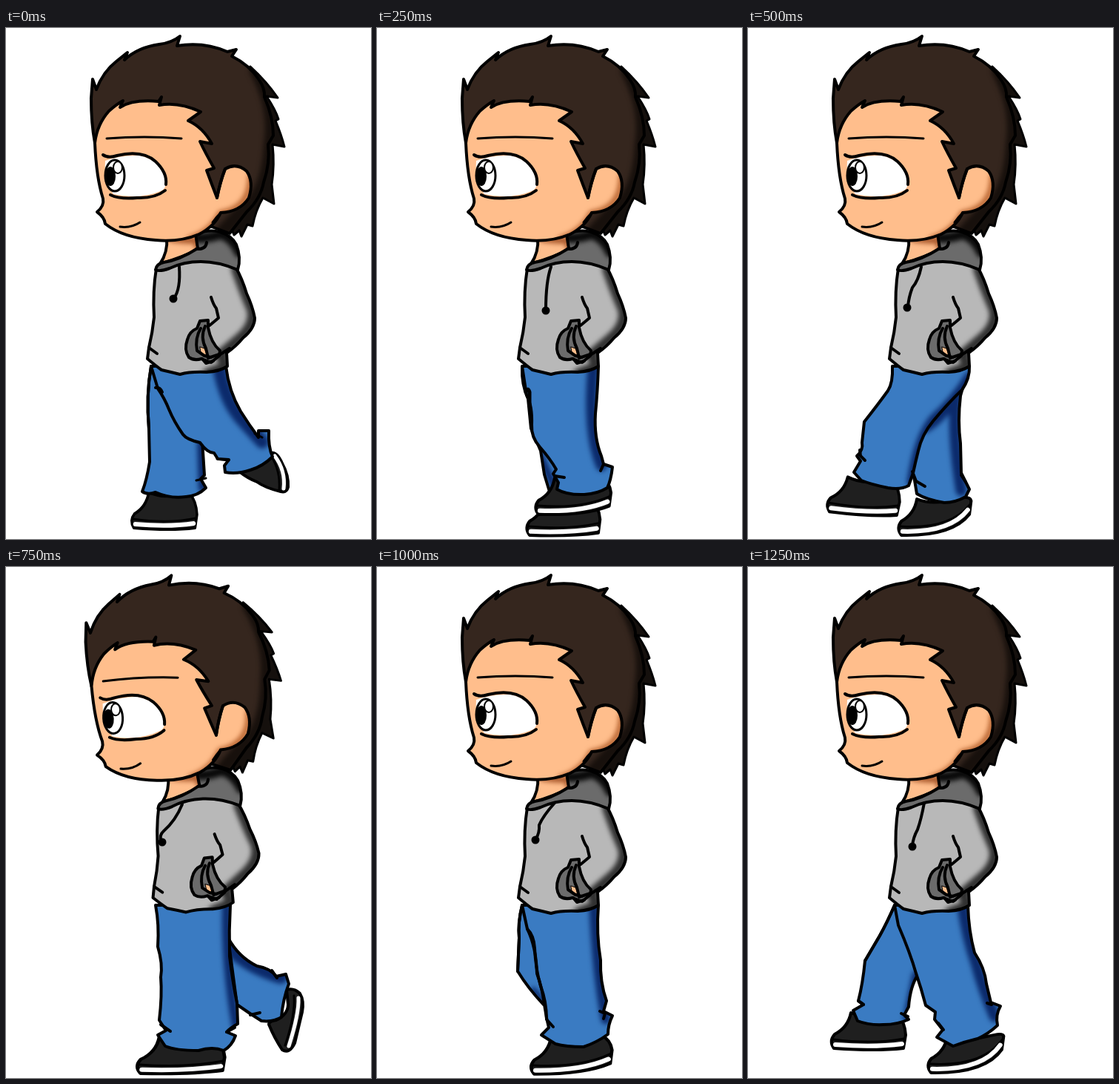
An HTML page with a canvas for the animation above (1.5 s loop, 493x689 px).

```html
<!DOCTYPE html>
<html>
<head>
<meta charset="utf-8">
<style>
html, body { margin: 0; width: 100%; height: 100%; overflow: hidden; background: #fff; }
canvas { display: block; }
</style>
</head>
<body>
<canvas id="stage" width="493" height="689"></canvas>
<script>
const ctx = document.getElementById('stage').getContext('2d');
const STEP = 250;
const HAIR = '#35261e', SKIN = '#ffbe8c', CLOTH = '#b8b8b8', HOOD = '#6b6b6b';
const JEANS = '#3a7bc2', NAVY = '#0b2a6b', SHOE = '#1f1f1f';

function line(d, width = 4, color = '#000') {
  ctx.lineWidth = width;
  ctx.strokeStyle = color;
  ctx.stroke(new Path2D(d));
}

// Filled outline with an optional soft shadow kept inside the shape.
function part(d, fill, shade, shadeColor, shadeWidth = 14, width = 4) {
  const path = new Path2D(d);
  ctx.fillStyle = fill;
  ctx.fill(path);
  if (shade) {
    ctx.save();
    ctx.clip(path);
    ctx.filter = 'blur(3px)';
    line(shade, shadeWidth, shadeColor);
    ctx.restore();
  }
  if (width) line(d, width);
}

function oval(x, y, rx, ry, fill, width) {
  ctx.beginPath();
  ctx.ellipse(x, y, rx, ry, 0, 0, 7);
  ctx.fillStyle = fill;
  ctx.fill();
  if (width) {
    ctx.lineWidth = width;
    ctx.strokeStyle = '#000';
    ctx.stroke();
  }
}

function turned(deg, x, y, draw) {
  ctx.save();
  ctx.translate(x, y);
  ctx.rotate(deg * Math.PI / 180);
  ctx.translate(-x, -y);
  draw();
  ctx.restore();
}

const jeans = (d, shade, width) => part(d, JEANS, shade, NAVY, width);

// Placed by the lower toe corner; lift raises the heel and bends the sole.
function shoe(x, y, size, deg, lift = 0) {
  ctx.save();
  ctx.translate(x, y);
  ctx.rotate(deg * Math.PI / 180);
  ctx.scale(size, 1);
  part(`M26-48Q45-40 65-44L88-48Q99-${36 + lift / 2} 100-${18 + lift}L97-${lift}Q${60 + lift / 2} 4 3 0Q-4-10 4-19Q22-28 26-48Z`, SHOE);
  line(`M2-12Q${56 + lift / 2}-5 98-${13 + lift}`, 3);
  line(`M5-5Q${57 + lift / 2}-1 95-${6 + lift}`, 6, '#fff');
  ctx.restore();
}

const poses = [
  {
    string: 'M234 322Q236 352 227 364', bead: [226, 365],
    legs() {
      shoe(170, 674, .88, 0);
      part('M315 598Q342 592 358 573Q366 571 373 587Q382 603 381 619Q379 627 371 625Q350 620 339 612Q326 607 315 598Z', SHOE);
      line('M363 577Q378 597 375 621', 5, '#fff');
      line('M358 577Q371 597 369 623', 3);
      jeans('M196 456Q189 495 193 540L194 585Q190 610 184 625Q191 630 202 626Q222 635 243 632Q259 631 270 620L263 608L268 603L265 556L240 490Z', 'M264 560L266 620', 12);
      jeans('M196 456L297 456Q301 490 317 517Q329 536 341 552L341 543L355 543Q354 565 360 578Q347 591 330 596Q312 602 296 599L295 590L301 582L286 581L281 573Q272 573 262 559Q244 555 239 548Q227 531 220 514Q214 499 205 486Z', 'M288 458Q296 502 317 526L346 558', 18);
      line('M202 485Q208 484 211 491');
      line('M196 456Q189 495 193 540');
      line('M257 610L270 607M285 581L301 583M336 547L346 552', 3);
    }
  },
  {
    string: 'M235 322Q228 342 228 380', bead: [228, 381],
    legs() {
      shoe(203, 684, .99, -2);
      jeans('M196 458Q195 480 204 500L208 540L221 570L226 602L233 625L246 624L240 580L215 490Z', 'M215 565L240 620', 10);
      shoe(215, 656, 1.02, -2, 8);
      jeans('M196 456L299 456Q298 490 295 520Q293 553 303 577L306 588L318 592Q316 610 311 620Q298 628 280 629Q257 630 243 622L245 613L238 601L242 595Q234 581 220 565Q208 552 209 535Q210 509 202 495Z', 'M292 458Q284 545 303 590', 15);
      line('M201 490Q204 484 206 491L206 510', 5);
      line('M240 604L253 606M306 588L302 597');
    }
  },
  {
    string: 'M234 322Q230 341 222 350Q217 363 216 376', bead: [215, 377],
    legs() {
      shoe(204, 684, .99, -2, 25);
      jeans('M298 456Q291 482 287 496Q283 530 287 560L288 600L299 622L294 632Q280 640 265 640Q241 636 228 628L225 610L222 598L228 560L255 500Z', 'M240 538Q264 524 281 492Q275 545 288 624', 15);
      shoe(107, 652, .97, 3);
      jeans('M195 456L299 456Q300 472 289 488Q271 505 250 530Q235 548 230 570Q226 586 223 600L217 617Q206 623 189 620Q165 615 153 610L143 599L152 584L147 577Q156 569 154 559L157 531Q176 507 189 489Q196 478 195 456Z', 'M299 470Q278 504 251 527Q230 552 221 612', 13);
      line('M151 569L152 577L158 583M222 598L227 611L239 618M288 603L294 612');
    }
  },
  {
    string: 'M238 320Q229 342 213 356Q206 362 210 371', bead: [211, 371], lean: true,
    legs() {
      part('M379 570Q389 567 397 575Q403 585 400 600L390 642Q383 657 373 651Q362 634 356 619Q352 613 365 611Q381 603 381 590Z', SHOE);
      line('M395 581Q396 602 382 646', 5, '#fff');
      line('M389 578Q391 604 377 645', 3);
      jeans('M300 500Q314 526 339 538Q357 541 365 552L378 549L382 562Q374 583 372 607Q361 614 345 612Q329 602 312 590Z', 'M303 513Q325 538 371 552', 20);
      line('M359 544L366 554M330 604L343 601');
      shoe(178, 683, 1.18, -2);
      jeans('M202 456L303 456Q301 490 302 525Q306 559 312 588L313 616Q302 622 298 627L310 632Q305 646 294 652Q279 646 260 652Q229 652 215 646L205 631L216 625L207 611Q211 577 209 553Q212 535 205 512Q207 482 202 456Z', 'M298 458Q296 535 311 620', 12);
      line('M209 617L222 626M298 627L309 621');
    }
  },
  {
    string: 'M240 318Q224 336 219 348Q220 358 214 368', bead: [214, 368],
    legs() {
      shoe(209, 684, 1.1, -3, 9);
      jeans('M196 456Q190 480 192 500L190 545Q204 568 225 590L238 570L220 490Z', 'M211 570L228 588', 7);
      jeans('M196 456L299 456Q296 495 302 530Q301 560 310 585L306 599L318 605Q312 617 312 630Q297 641 279 647Q255 647 241 643L222 631L232 621L229 608L226 590Q223 567 216 548Q215 512 203 488Z', 'M293 458Q297 550 309 610', 13);
      line('M203 488Q212 497 213 514Q214 541 221 565Q229 586 229 610L238 620');
      line('M196 456Q190 480 192 500L190 545');
      line('M301 599L308 602L306 609');
    }
  },
  {
    string: 'M238 318Q234 340 229 354Q223 365 222 376', bead: [222, 377],
    legs() {
      shoe(113, 649, 1, 0);
      jeans('M198 456Q188 479 178 497L158 531Q155 562 149 585L156 590L142 598L148 612Q163 618 183 617Q202 617 217 610L211 604L217 593Q219 565 230 549L232 490Z', 'M227 550L215 608', 11);
      shoe(244, 682, 1.03, -2, 28);
      jeans('M198 456L297 456Q298 491 306 520Q320 541 322 562L328 587L341 592Q334 604 337 618Q324 630 310 636Q293 640 277 646L255 634L263 624L252 610L253 600L240 591Q234 568 227 548Q219 520 203 483Z', 'M290 458Q296 500 308 534Q317 568 333 606', 15);
      line('M198 456Q188 479 178 497L158 531');
      line('M149 585L156 590M323 588L329 590M207 602L216 606M257 615L264 624');
    }
  }
];

function hoodie() {
  part('M203 324Q198 355 200 390Q198 410 193 431L191 446Q203 456 210 461Q223 464 235 467Q249 463 271 464Q289 463 299 456L298 438Q310 430 320 418Q336 405 336 391Q333 375 325 358Q319 338 310 322L260 306Z',
    CLOTH, 'M311 325Q322 357 332 379Q337 399 317 417L289 441L298 456L272 466', '#303030', 14);
  line('M193 431L204 439');
  line('M277 363Q280 373 284 378L287 391L275 401');
  line('M288 441L302 432');
  part('M258 405L262 395L273 394L273 404Q277 425 289 435L288 442L277 451L264 446Q254 449 247 444Q240 434 245 420Q248 409 258 405Z', HOOD);
  part('M262 430L268 432L272 441L264 440Z', SKIN, '', '', 0, 1);
  line('M263 405Q255 418 258 435L268 442L277 444M269 402Q262 417 270 432L273 445L288 440M265 446L270 452L280 449');
}

function hood() {
  part('M217 282L259 277L262 297Q242 308 208 318Q219 302 217 282Z', SKIN, 'M224 284Q245 287 256 286L261 298', '#a9582b', 9);
  part('M256 278Q274 271 289 275Q305 280 311 292Q318 310 313 326Q287 315 263 315Q240 315 221 324Q207 329 202 326Q203 318 213 316Q234 313 259 297Z',
    HOOD, 'M258 283Q272 284 290 278Q306 283 315 303', '#080808', 13);
  line('M257 298Q270 299 271 289');
}

function head() {
  part('M303 184L330 52Q352 72 367 94L352 92Q365 112 368 123L364 125Q372 144 376 160L360 157Q363 185 359 211L362 237L347 229Q337 246 333 267L326 265L318 281L315 273L308 279L304 270L294 275Z', '#15100d', '', '', 0, 3);
  part('M120 155Q115 128 115 95L117 69L122 83Q131 59 149 45L164 33L160 43Q178 26 207 22Q224 20 235 11L231 24Q267 18 299 32L311 29L305 38Q329 50 342 70Q350 82 349 93Q361 120 361 145L354 157Q357 182 348 208Q344 230 325 248L302 277L270 265L170 140Z',
    HAIR, 'M338 58Q365 108 357 158Q354 225 318 248L293 274', '#17100c', 18);
  part('M120 155Q123 130 139 112Q149 103 158 98L154 107Q171 96 206 99L210 93L207 104Q233 99 263 113L246 125Q266 134 278 156L262 153Q269 168 281 189L271 192Q278 211 285 229Q289 208 296 190Q311 181 325 193Q335 207 328 229Q316 248 290 249Q282 267 261 278Q235 289 202 286Q158 283 134 264Q133 255 123 248Q133 240 131 230Q122 202 120 155Z',
    SKIN, 'M330 200Q330 243 289 250Q276 275 248 284', '#b5602c', 7);
  line('M290 249Q284 255 279 262', 3);
  line('M285 229Q289 208 296 190');
  line('M136 149Q187 145 237 149', 3);
  part('M134 179Q155 171 181 172Q202 177 213 194Q220 212 211 219Q181 232 145 224Q132 204 134 179Z', '#fff', '', '', 0, 0);
  oval(147, 199, 13, 21, '#fff', 3);
  oval(141, 200, 7, 13, '#000');
  oval(151, 188, 6, 8, '#fff', 2);
  line('M131 171Q138 176 150 172Q184 164 202 180Q218 195 216 211');
  line('M141 225Q153 231 177 229Q201 230 215 219');
  line('M154 268Q169 270 181 262', 3);
}

function draw(pose) {
  ctx.clearRect(0, 0, 493, 689);
  ctx.lineCap = ctx.lineJoin = 'round';
  pose.legs();
  turned(pose.lean ? -2 : 0, 195, 230, () => {
    hoodie();
    hood();
  });
  line(pose.string);
  oval(...pose.bead, 5.5, 5.5, '#000');
  turned(pose.lean ? -2.8 : 0, 238, 250, head);
}

let shown;
function tick() {
  const pose = poses[Math.floor(performance.now() / STEP) % poses.length];
  if (pose !== shown) draw(shown = pose);
  requestAnimationFrame(tick);
}
tick();
</script>
</body>
</html>
```
